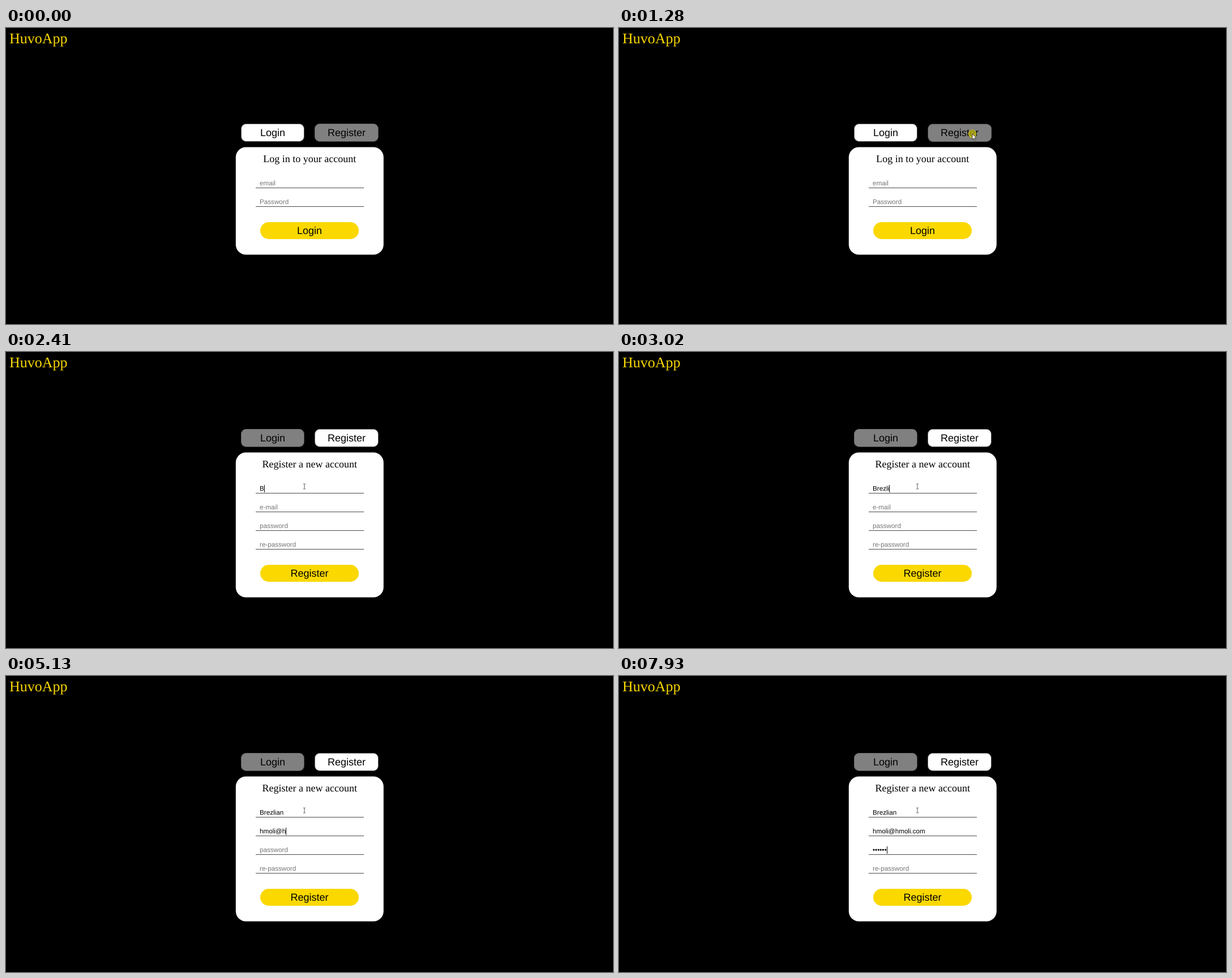
An HTML page for the animation above (8000 ms loop, 1072x523 px).

```html
<!DOCTYPE html>
<html lang="en">
<head>
<meta charset="utf-8">
<title>Sign-up form</title>
<style>
  html, body { margin: 0; width: 100%; height: 100%; overflow: hidden; background: #000; }
  #stage {
    position: relative; width: 1072px; height: 523px; overflow: hidden;
    font-family: "Liberation Sans", Arial, sans-serif; color: #000;
    text-rendering: geometricPrecision; cursor: default;
  }
  #stage div, #stage svg { position: absolute; box-sizing: border-box; white-space: pre; }
  #stage .view { inset: 0; }
  .brand, .title { font-family: "Liberation Serif", "Times New Roman", serif; }
  .brand { left: 6px; top: 4px; font-size: 26px; line-height: 30px; color: #fad800; }
  .tab {
    height: 32px; border: 1px solid; border-color: #6a6a6a #484848 #484848 #6a6a6a;
    border-radius: 9px; background: #808080;
    font-size: 18px; line-height: 30px; text-align: center;
  }
  .tab.on { background: #fff; }
  .tab.pressed { border-color: #303030 #6a6a6a #6a6a6a #303030; }
  .first { left: 415px; width: 112px; }
  .second { left: 545px; width: 113px; }
  .card {
    left: 406px; width: 261px; border-radius: 18px; background: #fff;
    transform: translate(-.2px, .5px);
  }
  .title { left: 0; width: 100%; top: 9px; font-size: 18px; line-height: 22px; text-align: center; }
  .field {
    left: 441px; width: 191px; height: 15px; padding-left: 7px;
    border-bottom: 1px solid #4a4a4a; font-size: 11.67px; line-height: 13px;
  }
  .hint { color: #757575; }
  .caret { position: absolute; width: 1px; height: 13px; background: #000; }
  .submit {
    left: 449px; width: 174px; height: 30px; border-radius: 15px;
    background: #fad800; font-size: 18px; line-height: 30px; text-align: center;
  }
  #pointer { left: 0; top: 0; width: 32px; height: 32px; overflow: visible; }
  [hidden] { display: none !important; }
</style>
</head>
<body>
<div id="stage">
  <div class="brand">HuvoApp</div>

  <div class="view" id="login">
    <div class="tab first on" style="top:169px">Login</div>
    <div class="tab second" id="openRegister" style="top:169px">Register</div>
    <div class="card" style="top:210px;height:189.5px"><div class="title">Log in to your account</div></div>
    <div class="field" style="top:268px"><span class="hint">email</span></div>
    <div class="field" style="top:301px"><span class="hint">Password</span></div>
    <div class="submit" style="top:343px">Login</div>
  </div>

  <div class="view" id="register" hidden>
    <div class="tab first" style="top:136px">Login</div>
    <div class="tab second on" style="top:136px">Register</div>
    <div class="card" style="top:177px;height:255.5px"><div class="title">Register a new account</div></div>
    <div class="field typed" style="top:235px"><span></span><i class="caret"></i><span class="hint">name</span></div>
    <div class="field typed" style="top:268px"><span></span><i class="caret"></i><span class="hint">e-mail</span></div>
    <div class="field typed" style="top:301px"><span></span><i class="caret"></i><span class="hint">password</span></div>
    <div class="field" style="top:334px"><span class="hint">re-password</span></div>
    <div class="submit" style="top:376px">Register</div>
  </div>

  <svg id="pointer">
    <circle id="halo" r="7.5" fill="#d2c800" fill-opacity=".65"/>
    <path id="arrow" d="M0 0V10L2.3 7.8 3.8 11.4 5.4 10.7 3.9 7.2H6.9Z" fill="#fff" stroke="#222" stroke-width=".8"/>
    <path id="beam" d="M-2 -4.5H-.5L0 -4 .5 -4.5H2M0 -4V4M-2 4.5H-.5L0 4 .5 4.5H2" fill="none" stroke="#444" stroke-width=".9"/>
  </svg>
</div>

<script>
const LOOP = 8000;
const $ = id => document.getElementById(id);

// Pointer stops: time, x, y
const stops = [
  [590, 948, 508], [690, 884, 438], [790, 805, 358], [890, 732, 287],
  [985, 672, 229], [1085, 640, 201], [1180, 624, 187],
  [1500, 598, 204], [1600, 547, 231], [1700, 526, 238], [1900, 527, 237.5]
];

// Each field: time it gains focus, value, time of every keystroke
const inputs = [
  { focus: 2000, value: "Brezlian", keys: [2410, 2510, 2720, 2820, 2920, 3020, 3320, 3420] },
  { focus: 3940, value: "hmoli@hmoli.com", keys: [4230, 4330, 4430, 4530, 4730, 4830, 5130, 5230, 5330, 5430, 5630, 6040, 6140, 6240, 6440] },
  { focus: 6650, value: "••••••", keys: [6950, 7130, 7440, 7640, 7850, 7930] }
];
document.querySelectorAll(".typed").forEach((el, i) => {
  [inputs[i].text, inputs[i].caret, inputs[i].hint] = el.children;
});

const show = (el, on) => el.toggleAttribute("hidden", !on);

function drawPointer(t) {
  const stop = stops.filter(s => s[0] <= t).pop();
  show($("pointer"), stop);
  if (!stop) return;
  const [, x, y] = stop;
  const overField = t >= 1400 && x > 441 && x < 632 && y > 229;
  $("pointer").style.transform = `translate(${x}px, ${y}px)`;
  show($("arrow"), !overField);
  show($("beam"), overField);
}

function drawInput(input, i, t) {
  const count = input.keys.filter(k => k <= t).length;
  const next = inputs[i + 1];
  const text = input.value.slice(0, count);
  if (input.text.textContent !== text) input.text.textContent = text;
  show(input.hint, !count);
  show(input.caret, t >= input.focus && (!next || t < next.focus));
}

function draw(t) {
  const registering = t >= 1400;
  const pressed = t >= 1280 && !registering;
  show($("login"), !registering);
  show($("register"), registering);
  $("openRegister").classList.toggle("pressed", pressed);
  show($("halo"), pressed);
  drawPointer(t);
  inputs.forEach((input, i) => drawInput(input, i, t));
}

const start = performance.now();
function tick() {
  draw((performance.now() - start) % LOOP);
  requestAnimationFrame(tick);
}
draw(0);
requestAnimationFrame(tick);
</script>
</body>
</html>
```
